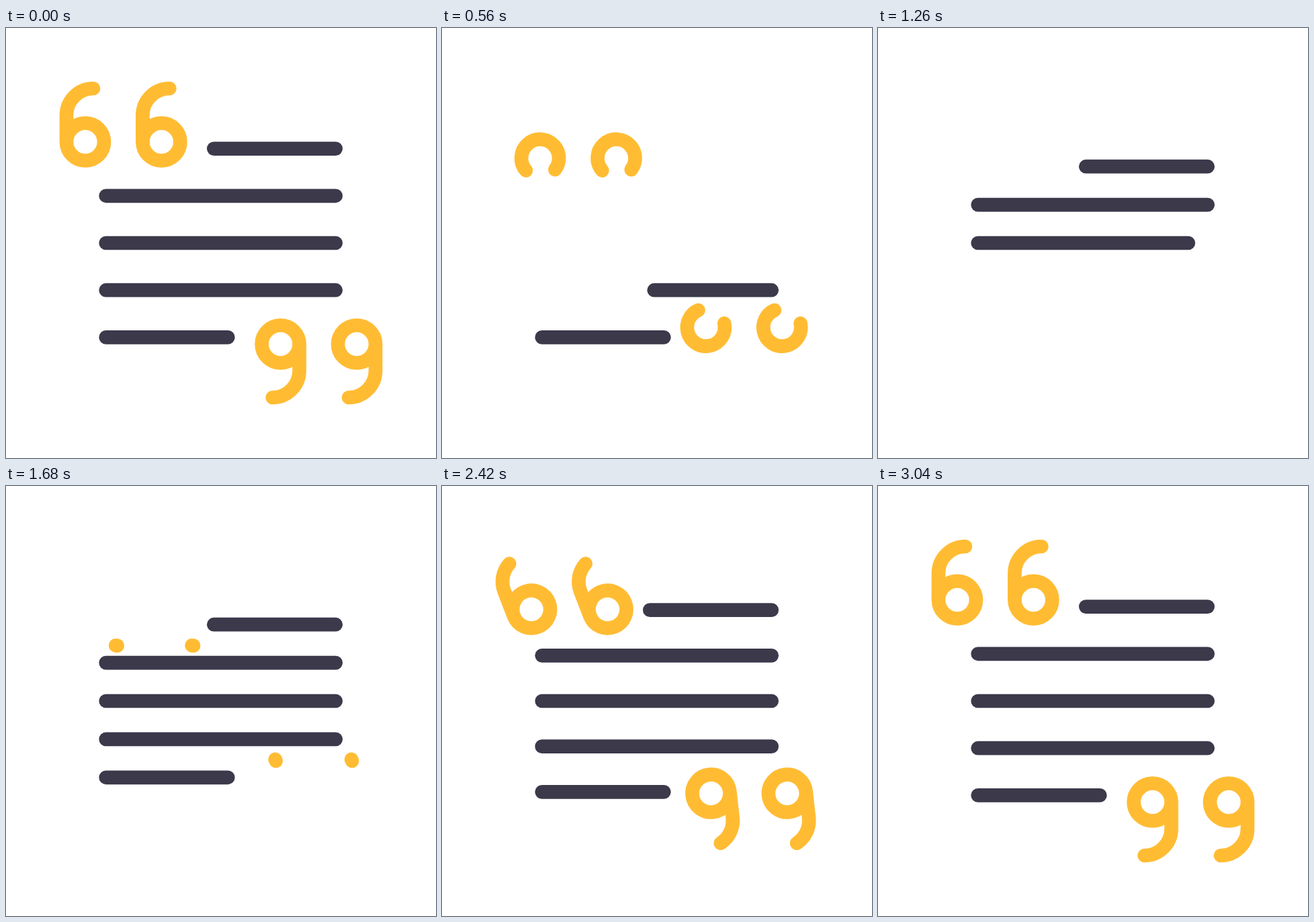
Recreate the animation shown at these times as an HTML page with a canvas. Size 640x640 px, loop 3600 ms.

```html
<!DOCTYPE html>
<html lang="en">
<head>
<meta charset="utf-8">
<title>Quote</title>
<style>
  html, body { margin: 0; width: 100%; height: 100%; overflow: hidden; background: #fff; }
  canvas { display: block; width: 640px; height: 640px; }
</style>
</head>
<body>
<canvas id="stage"></canvas>
<script>
const LOOP = 3600, SIZE = 640, MID = 320;
const YELLOW = '#ffbc33', DARK = '#3c394b', WEIGHT = 20.7;
const WIDE_GAP = 70.2, TIGHT_GAP = 56.9;
const LINES = [[309.3, 490.7], [148.7, 490.7], [148.7, 490.7], [148.7, 490.7], [148.7, 330.3]];
const LINES_LENGTH = LINES.reduce((sum, [a, b]) => sum + b - a, 0);

// One opening mark around its own centre: hook, stem, then the ring.
const HOOK = 40, STEM = 39.5, RING = 28;
const MARK_LENGTH = HOOK * Math.PI / 2 + STEM + RING * Math.PI * 2;
const mark = new Path2D();
mark.arc(12, -13.5, HOOK, -Math.PI / 2, -Math.PI, true);
mark.lineTo(-RING, 26);
mark.arc(0, 26, RING, Math.PI, -Math.PI, true);

// flip turns the mark into a closing one; dx, dy, turn lead to the folded pose.
const OPENING = { x: 118, y: 143.5, flip: 0, dx: 24.2, dy: 67.2, turn: 90 };
const CLOSING = { x: 408.6, y: 496.5, flip: Math.PI, dx: -22.5, dy: -56, turn: 27 };
const PAIR_STEP = 113.4;

const canvas = document.getElementById('stage');
const scale = window.devicePixelRatio || 1;
canvas.width = canvas.height = SIZE * scale;
const ctx = canvas.getContext('2d');

// Cubic ease with flat ends and handles at x1 and x2.
function ease(t, start, end, x1, x2) {
  const x = (t - start) / (end - start);
  if (x <= 0) return 0;
  if (x >= 1) return 1;
  let lo = 0, hi = 1;
  for (let i = 0; i < 24; i++) {
    const u = (lo + hi) / 2, v = 1 - u;
    if (3 * v * v * u * x1 + 3 * v * u * u * x2 + u * u * u < x) lo = u;
    else hi = u;
  }
  return lo * lo * (3 - 2 * lo);
}
const leave = (t, start, end) => ease(t, start, end, 0.546, 0.667);
const enter = (t, start, end) => ease(t, start, end, 0.333, 0.454);

// The trim runs through all lines as if they were one.
function drawLines(t) {
  const from = t < 900 ? leave(t, 0, 784) * LINES_LENGTH : 0;
  const to = t < 900 ? LINES_LENGTH : enter(t, 945, 1604) * LINES_LENGTH;
  const spread = t < 900 ? 1 : enter(t, 1850, 2760);
  const gap = TIGHT_GAP + (WIDE_GAP - TIGHT_GAP) * spread;
  let done = 0;
  ctx.strokeStyle = DARK;
  LINES.forEach(([left, right], i) => {
    const length = right - left;
    const a = Math.max(0, from - done), b = Math.min(length, to - done);
    done += length;
    if (b - a < 0.01) return;
    const y = MID + (i - 2) * gap;
    ctx.beginPath();
    ctx.moveTo(left + a, y);
    ctx.lineTo(left + b, y);
    ctx.stroke();
  });
}

function drawPair(pose, fold, hidden) {
  const start = hidden * MARK_LENGTH;
  if (MARK_LENGTH - start < 0.05) return;
  for (let i = 0; i < 2; i++) {
    ctx.save();
    ctx.translate(pose.x + i * PAIR_STEP + pose.dx * fold, pose.y + pose.dy * fold);
    ctx.rotate(pose.flip - pose.turn * fold * Math.PI / 180);
    if (hidden > 0) {
      ctx.setLineDash([MARK_LENGTH - start + 1, 2000]);
      ctx.lineDashOffset = -start;
    }
    ctx.stroke(mark);
    ctx.restore();
  }
}

function draw(t) {
  ctx.setTransform(scale, 0, 0, scale, 0, 0);
  ctx.fillStyle = '#fff';
  ctx.fillRect(0, 0, SIZE, SIZE);
  ctx.lineWidth = WEIGHT;
  ctx.lineCap = ctx.lineJoin = 'round';
  drawLines(t);

  const leaving = t < 1300;
  const fold = leaving ? leave(t, 0, 1012) : 1 - enter(t, 1517, 3048);
  const hidden = leaving ? leave(t, 0, 927) : 1 - enter(t, 1620, 2660);
  ctx.strokeStyle = YELLOW;
  drawPair(OPENING, fold, hidden);
  drawPair(CLOSING, fold, hidden);
}

const began = performance.now();
function tick() {
  draw((performance.now() - began) % LOOP);
  requestAnimationFrame(tick);
}
tick();
</script>
</body>
</html>
```
